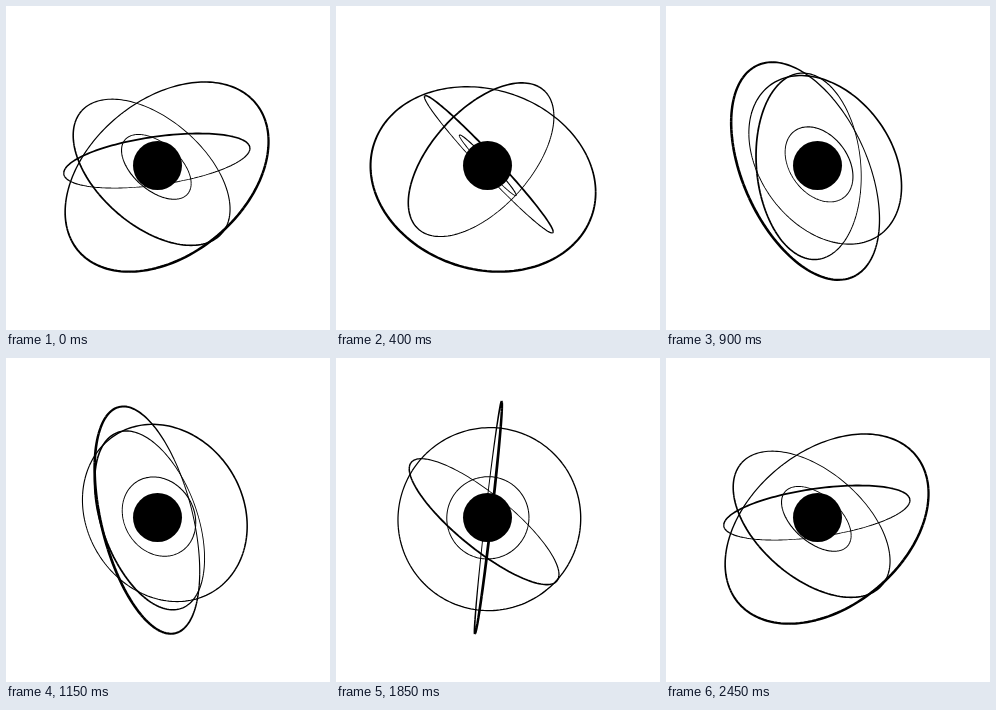
These frames come from a looping animation (324x324 px, 2500 ms). An HTML page with a canvas:

```html
<!DOCTYPE html>
<html lang="en">
<head>
<meta charset="utf-8">
<title>Orbiting rings</title>
<style>
  html, body { margin: 0; width: 100%; height: 100%; overflow: hidden; background: #fff; }
  canvas { display: block; width: 324px; height: 324px; }
</style>
</head>
<body>
<canvas id="stage" width="324" height="324"></canvas>
<script>
const ctx = document.getElementById('stage').getContext('2d');
const LOOP = 2500, STEP = 50, LAST = LOOP / STEP - 1;
const CX = 151.5, CY = 159.5, CORE = 24.5;
const CAMERA = 450, SEGMENTS = 180;
const RAD = Math.PI / 180;

// Each ring turns around one of its own diameters (axis); z points at the viewer.
const rings = [
  { radius: 113.2, width: 1.85, axis: [-0.073, 0.777, 0.628], phase: -122 },
  { radius: 91.8, width: 1.3, axis: [0.686, 0.715, 0.131], phase: -34.6 },
  { radius: 92.1, width: 1.3, axis: [0.5545, 0.136, -0.821], phase: -153.9 },
  { radius: 41.3, width: 1, axis: [0.686, 0.715, 0.131], phase: -34.6 }
];

// Half a turn per loop, fast near the ends and slow past the middle.
function turn(u) {
  const x = 2 * Math.PI * u;
  return 180 * u + 12.8 * Math.sin(x) + 2.85 * (1 - Math.cos(x))
    - 0.4 * Math.sin(2 * x) - (1 - Math.cos(2 * x));
}

function ringPoint(ring, angle, theta) {
  const [kx, ky, kz] = ring.axis;
  const h = Math.hypot(kx, ky);
  const e1 = [ky / h, -kx / h, 0];
  const e2 = [-kz * e1[1], kz * e1[0], kx * e1[1] - ky * e1[0]];
  const c = Math.cos(theta), s = Math.sin(theta);
  const [x, y, z] = ring.axis.map((k, i) =>
    ring.radius * (c * k + s * (Math.cos(angle) * e2[i] - Math.sin(angle) * e1[i])));
  const scale = CAMERA / (CAMERA - z);
  return { x: CX + x * scale, y: CY + y * scale, half: ring.width * (1 + z / 220) / 2 };
}

function drawRing(ring, degrees) {
  const angle = (ring.phase + degrees) * RAD;
  const points = Array.from({ length: SEGMENTS }, (_, i) =>
    ringPoint(ring, angle, 2 * Math.PI * i / SEGMENTS));
  ctx.beginPath();
  points.forEach((a, i) => {
    const b = points[(i + 1) % SEGMENTS];
    const dx = b.x - a.x, dy = b.y - a.y;
    const len = Math.hypot(dx, dy) || 1;
    const nx = -dy / len, ny = dx / len;
    ctx.moveTo(a.x + nx * a.half, a.y + ny * a.half);
    ctx.lineTo(b.x + nx * b.half, b.y + ny * b.half);
    ctx.lineTo(b.x - nx * b.half, b.y - ny * b.half);
    ctx.lineTo(a.x - nx * a.half, a.y - ny * a.half);
    ctx.closePath();
  });
  ctx.fill();
}

function draw(ms) {
  const degrees = turn(Math.floor(ms % LOOP / STEP) / LAST);
  ctx.fillStyle = '#fff';
  ctx.fillRect(0, 0, 324, 324);
  ctx.fillStyle = '#000';
  rings.forEach(ring => drawRing(ring, degrees));
  ctx.beginPath();
  ctx.arc(CX, CY, CORE, 0, 2 * Math.PI);
  ctx.fill();
}

const start = performance.now();
function tick() {
  draw(performance.now() - start);
  requestAnimationFrame(tick);
}
tick();
</script>
</body>
</html>
```
